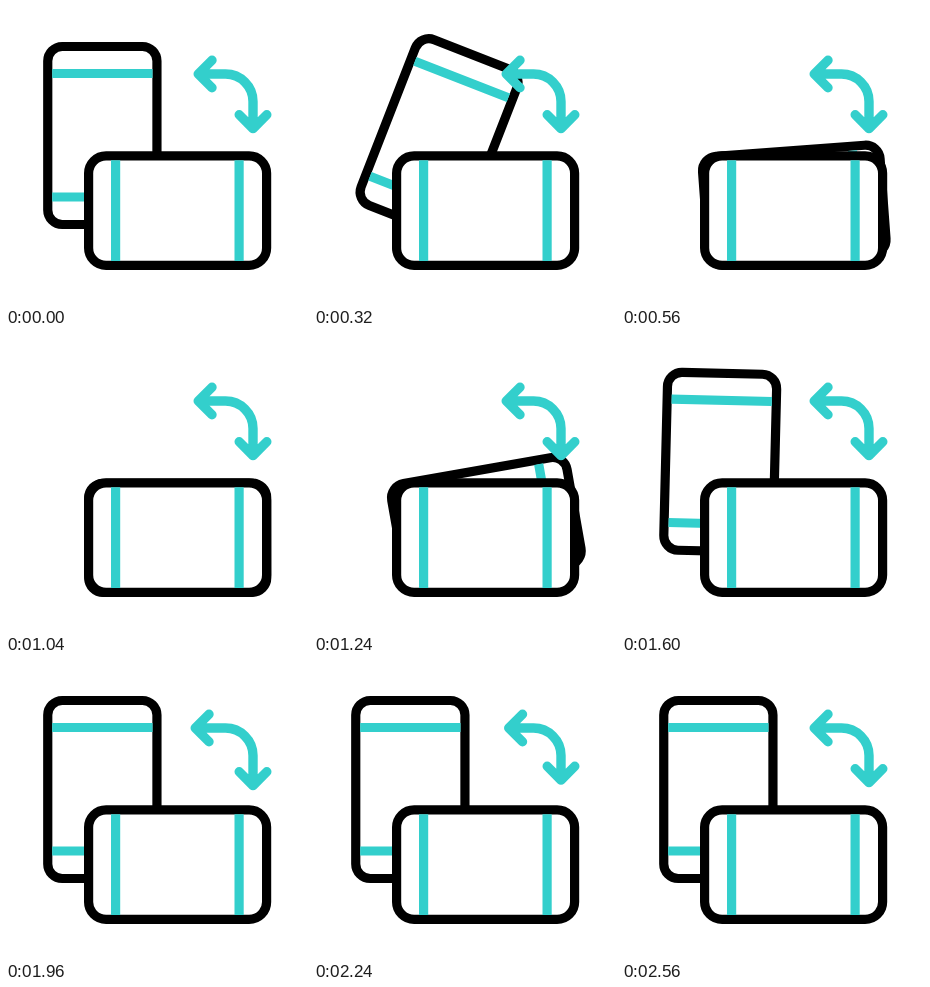
Write an HTML page that moves like this. It is 302 px wide and 299 px high and loops after 2.8 s.

```html
<!DOCTYPE html>
<html lang="en">
<head>
<meta charset="utf-8">
<title>Rotate phone</title>
<style>
  html, body { margin: 0; width: 100%; height: 100%; overflow: hidden; background: #fff; }
  svg { display: block; width: 100%; height: 100%; }
  .body { fill: #fff; stroke: #000; stroke-width: 9.2; }
  .band, .arrow { fill: none; stroke: #33cfcc; stroke-width: 9.2; }
  .arrow { stroke-width: 9.4; stroke-linecap: round; stroke-linejoin: round; }
</style>
</head>
<body>
<svg viewBox="0 0 302 299">
  <g id="phone">
    <rect class="body" x="-54.6" y="-89" width="109.2" height="178" rx="14.5"/>
    <path class="band" d="M-50.2 -62H50.2M-50.2 61.5H50.2"/>
  </g>
  <g transform="translate(171.6 204.6)">
    <rect class="body" x="-89" y="-54.8" width="178" height="109.6" rx="17.5"/>
    <path class="band" d="M-62 -50.4V50.4M61.5 -50.4V50.4"/>
  </g>
  <path class="arrow" id="arrow"/>
</svg>
<script>
  const LOOP = 2800;
  const TURN = 680;
  const PIVOT = { x: 96.35, y: 204.85 };
  const phone = document.getElementById('phone');
  const arrow = document.getElementById('arrow');

  const clamp = v => Math.min(1, Math.max(0, v));

  // cubic-bezier(.74, 0, .26, 1), solved by bisection
  function ease(p) {
    let lo = 0, hi = 1;
    for (let i = 0; i < 24; i++) {
      const s = (lo + hi) / 2, u = 1 - s;
      const x = 3 * u * u * s * 0.74 + 3 * u * s * s * 0.26 + s * s * s;
      if (x < p) lo = s; else hi = s;
    }
    return lo * lo * (3 - 2 * lo);
  }

  const turnFrom = (t, start) => {
    const p = clamp((t - start) / TURN);
    return p === 0 || p === 1 ? p : ease(p);
  };

  // The phone swings around the pivot on a slightly bulging quarter arc.
  function posePhone(t) {
    const turn = turnFrom(t, 40) - turnFrom(t, 1020);
    const a = turn * Math.PI / 2;
    const r = 75.35 + 5.4 * Math.sin(2 * a);
    const x = PIVOT.x + r * Math.sin(a);
    const y = PIVOT.y - r * Math.cos(a);
    phone.setAttribute('transform', `translate(${x} ${y}) rotate(${turn * 90})`);
  }

  // Both heads slide along their shafts, outwards and then inwards.
  function poseArrow(t) {
    const d = 3.3 * Math.sin(2 * Math.PI * clamp((t - 1680) / 880));
    const x = 192.2 - d, y = 122.6 + d;
    arrow.setAttribute('d',
      `M${x} 68H219.5A27.5 27.5 0 0 1 247 95.5V${y}` +
      `M${x + 13.8} 54.2L${x} 68L${x + 13.8} 81.8` +
      `M233.2 ${y - 13.8}L247 ${y}L260.8 ${y - 13.8}`);
  }

  const began = performance.now();
  function draw() {
    const t = (performance.now() - began) % LOOP;
    posePhone(t);
    poseArrow(t);
    requestAnimationFrame(draw);
  }
  draw();
</script>
</body>
</html>
```
